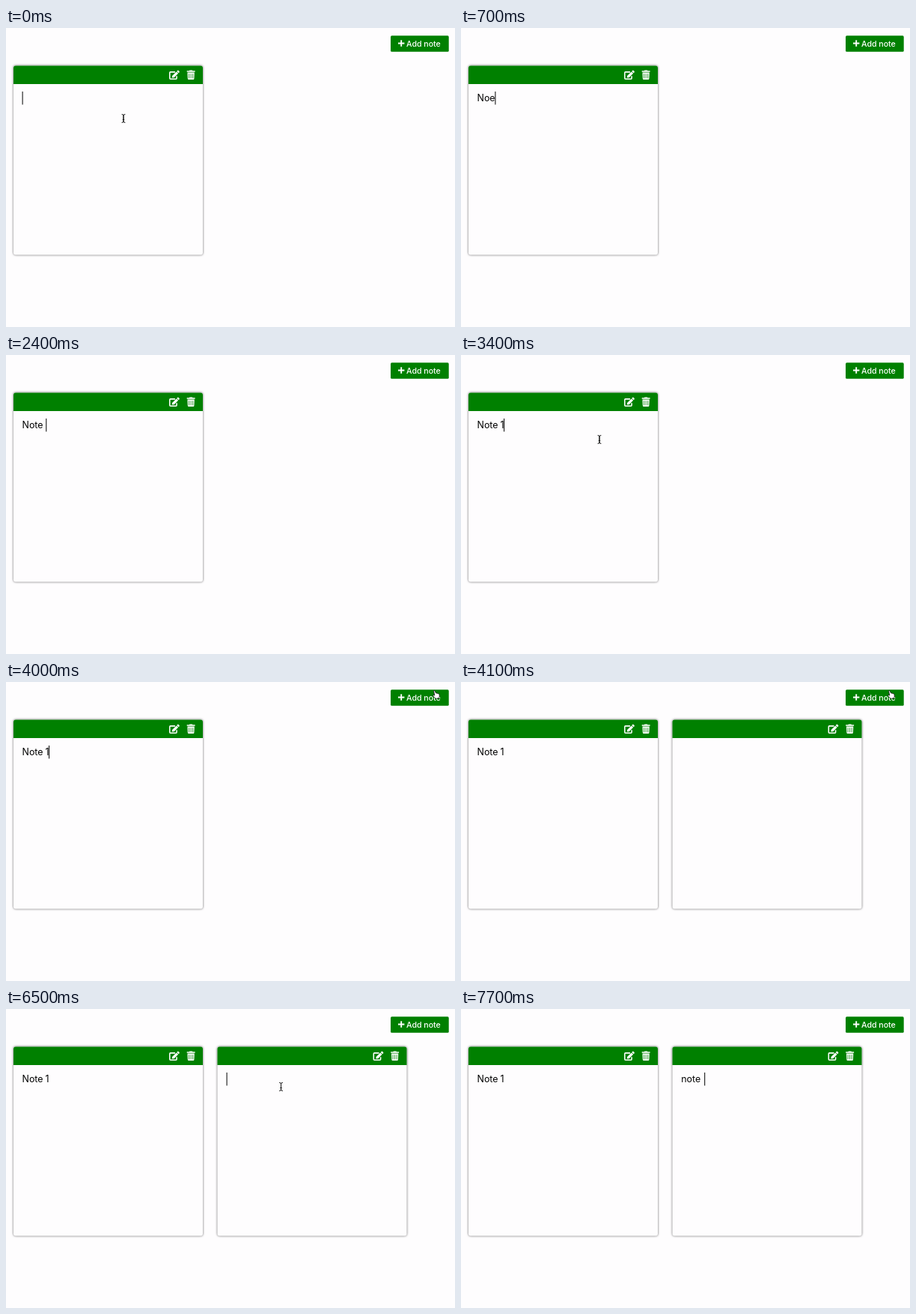
An HTML page that plays this animation: 600 by 400 pixels, repeating every 8 s.

```html
<!DOCTYPE html>
<html lang="en">
<head>
<meta charset="utf-8">
<title>Notes</title>
<style>
  html, body { margin: 0; width: 100%; height: 100%; overflow: hidden; background: #fefdfe; }
  svg { display: block; width: 600px; height: 400px; }
  text { font-family: Inter, "Open Sans", sans-serif; }
  .note { font-size: 12.4px; word-spacing: -.6px; fill: #000; }
  .label { font-size: 10.6px; font-weight: 500; fill: #fff; }
  .card { filter: drop-shadow(0 0 1.5px rgba(0, 0, 0, .62)); }
</style>
</head>
<body>
<svg viewBox="0 0 600 400">
  <defs>
    <g id="edit" fill="#fff">
      <path d="M8 2.35H1.8q-1 0-1 1V10.7q0 1 1 1H9.1q1 0 1-1V7.8" fill="none" stroke="#fff" stroke-width="1.55"/>
      <path d="M9.7 1.9L12.1 4.3L6.7 9.8L3.9 10.1L4.1 7.4Z"/>
      <path d="M10.2 1.4L11.2.4Q11.9-.2 12.6.4L13.6 1.4Q14.2 2.1 13.6 2.8L12.6 3.8Z"/>
    </g>
    <g id="trash">
      <path d="M0 .8H3.1L3.7 0H7.2L7.8.8H10.9V2.3H0ZM.8 3.1H10.1L9.7 11.4Q9.6 12.5 8.5 12.5H2.4Q1.3 12.5 1.2 11.4Z" fill="#fff"/>
      <path d="M2.9 4.7V10.9M5.45 4.7V10.9M8 4.7V10.9" stroke="#008000" stroke-width=".8"/>
    </g>
    <g id="card">
      <g class="card">
        <rect width="253" height="253" rx="3" fill="#fefdfe"/>
        <path d="M0 24.5V3Q0 0 3 0H250Q253 0 253 3V24.5Z" fill="#008000"/>
      </g>
      <use href="#edit" x="208" y="6"/>
      <use href="#trash" x="231.7" y="6"/>
    </g>
  </defs>

  <rect x="514" y="10.3" width="77.7" height="21.5" rx="1.6" fill="#008000"/>
  <path d="M524 20.5H532.4M528.2 16.3V24.7" stroke="#fff" stroke-width="1.9"/>
  <text class="label" x="535" y="24.5">Add note</text>

  <use href="#card" x="10" y="50.5"/>
  <use href="#card" x="282.5" y="50.5" id="second"/>
  <text class="note" id="text1" x="21.6" y="98"></text>
  <text class="note" id="text2" x="294.3" y="98"></text>
  <rect id="caret" y="85" width="1" height="17.5"/>

  <g id="beam" fill="none">
    <path d="M-2.3-5.5Q0-5.5 0-4V4Q0 5.5-2.3 5.5M2.3-5.5Q0-5.5 0-4V4Q0 5.5 2.3 5.5M-1.2 1.5H1.2" stroke="#111"/>
  </g>
  <path id="arrow" d="M0 0V10L2.3 7.8L3.8 11.3L5.3 10.6L3.8 7.3H7Z" fill="#000" stroke="#fff" stroke-width=".7"/>
  <path id="hand" d="M-1.5-5.2Q-.6-6 .2-5L1.4-2.3L4.8-1.5Q6.2-1 6.2.6L6 4.4L1.4 5.3L-2.4 1.4Q-2.6.1-1.1.5L-.2 1Z" fill="#fff" stroke="#111" stroke-width=".8"/>
</svg>
<script>
  const LOOP = 8000;
  const $ = id => document.getElementById(id);

  // [time, first note, second note, caret x or null]
  const typing = [
    [0, "", "", 21.6],
    [300, "N", "", 30.8],
    [500, "No", "", 37.7],
    [700, "Noe", "", 45.4],
    [800, "Noet", "", 50],
    [1000, "Noet", "", null],
    [1500, "Noe", "", 45.4],
    [1600, "No", "", 37.7],
    [1700, "No", "", null],
    [2200, "Not", "", 42.6],
    [2300, "Note", "", 50],
    [2400, "Note ", "", 53.3],
    [2700, "Note ", "", null],
    [2900, "Note 1", "", 57.1],
    [4100, "Note 1", "", null],
    [6500, "Note 1", "", 294.6],
    [7100, "Note 1", "n", 302],
    [7300, "Note 1", "no", 310],
    [7500, "Note 1", "not", 314.4],
    [7700, "Note 1", "note ", 325.2]
  ];

  // [time, cursor shape, x, y]
  const pointer = [
    [0, "beam", 157, 121],
    [400, ""],
    [3300, "beam", 160, 119],
    [3400, "beam", 185, 113],
    [3500, "beam", 240, 98],
    [3600, "arrow", 325, 74],
    [3700, "arrow", 420, 48],
    [3800, "arrow", 500, 28],
    [3900, "hand", 552, 19],
    [4000, "hand", 573, 17],
    [4400, "beam", 440, 98],
    [4500, "beam", 384.5, 132],
    [5000, ""],
    [6000, "beam", 384, 140],
    [6100, "beam", 378, 159],
    [6200, "beam", 370, 128],
    [6300, "beam", 367.5, 104],
    [7100, ""]
  ];

  const at = (steps, t) => steps.findLast(step => step[0] <= t);
  const show = (el, on) => el.setAttribute("visibility", on ? "visible" : "hidden");

  function draw(t) {
    const [, first, second, caretX] = at(typing, t);
    $("text1").textContent = first;
    $("text2").textContent = second;
    show($("caret"), caretX !== null);
    if (caretX !== null) $("caret").setAttribute("x", caretX);
    show($("second"), t >= 4100);

    const [, shape, x, y] = at(pointer, t);
    for (const id of ["beam", "arrow", "hand"]) {
      show($(id), id === shape);
      if (id === shape) $(id).setAttribute("transform", `translate(${x} ${y})`);
    }
  }

  function tick() {
    draw(performance.now() % LOOP);
    requestAnimationFrame(tick);
  }
  tick();
</script>
</body>
</html>
```
